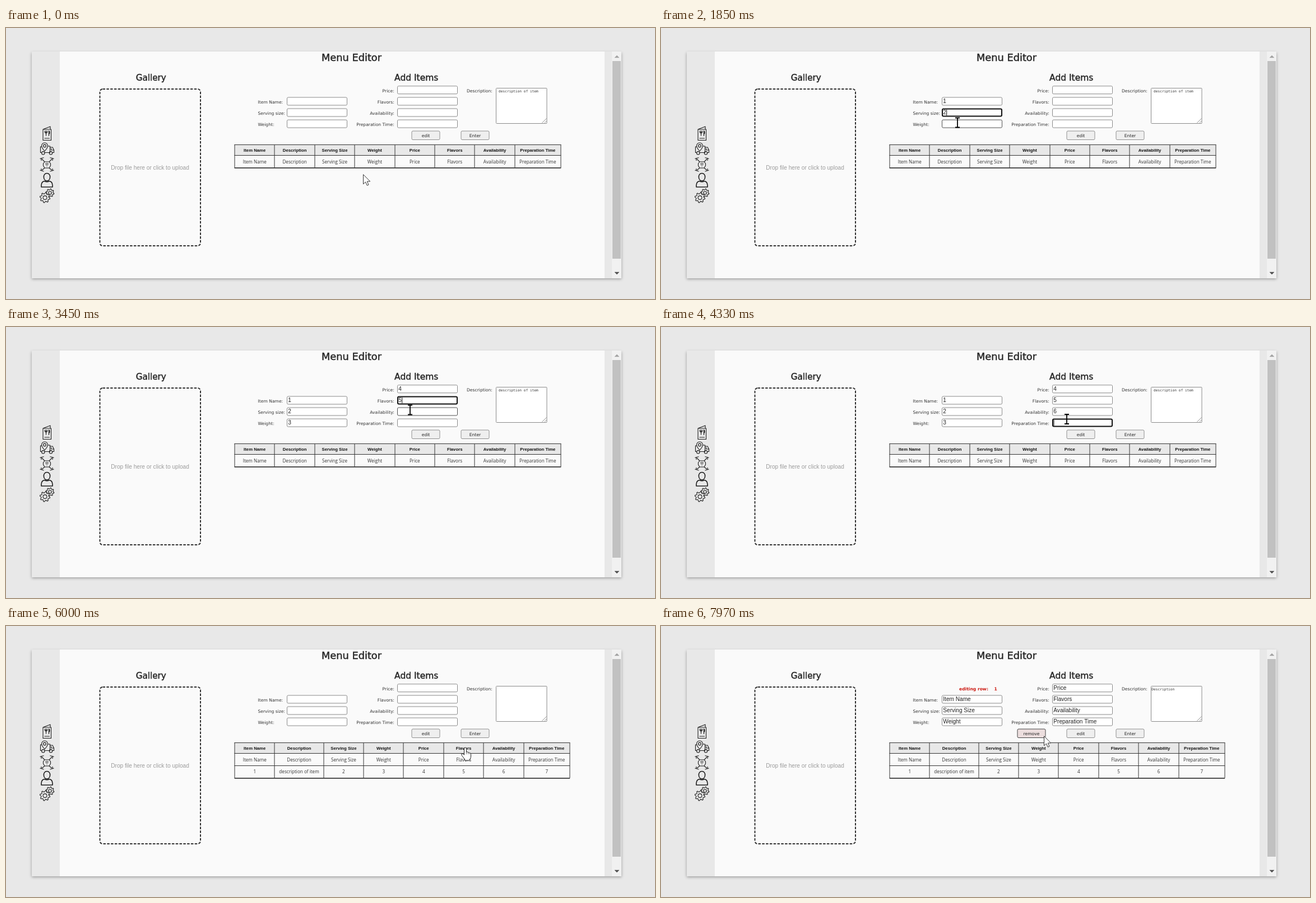
These frames come from a looping animation (1158x484 px, 8 s). An HTML page with a canvas:

```html
<!DOCTYPE html>
<html lang="en">
<head>
<meta charset="utf-8">
<title>Menu Editor</title>
<style>
html, body { margin: 0; width: 100%; height: 100%; overflow: hidden; background: #e8e8e8 }
canvas { display: block }
</style>
</head>
<body>
<canvas id="stage" width="1158" height="484"></canvas>
<script>
const ctx = document.getElementById('stage').getContext('2d');
const SANS = '"DejaVu Sans", Verdana, sans-serif';
const ARIAL = '"Liberation Sans", Arial, sans-serif';
const OPEN = '"Open Sans", sans-serif';
const MONO = '"DejaVu Sans Mono", monospace';
const LOOP = 8000, SUBMIT = 5230, BLUR = 5090, EDIT = 7110;

const columns = ['Item Name', 'Description', 'Serving Size', 'Weight', 'Price', 'Flavors', 'Availability', 'Preparation Time'];
const added = ['1', 'description of item', '2', '3', '4', '5', '6', '7'];

// label, column, left, top, time of focus, time of typing
const fields = [
  ['Item Name:', 0, 501, 123.4, 900, 1220],
  ['Serving size:', 2, 501, 143.5, 1530, 1690],
  ['Weight:', 3, 501, 163.6, 2140, 2215],
  ['Price:', 4, 698, 103.2, 2600, 2750],
  ['Flavors:', 5, 698, 123.4, 3070, 3300],
  ['Availability:', 6, 698, 143.5, 3700, 3860],
  ['Preparation Time:', 7, 698, 163.6, 4330, 4480]
].map(([label, col, x, y, focus, typed]) => ({ label, col, x, y, focus, typed, w: 108, h: 15 }));

// pointer moves: first step, last step, number of steps, destination
const moves = [
  [70, 300, 4, 524, 89], [470, 730, 4, 530, 134], [1220, 1290, 2, 530, 153],
  [1770, 1850, 2, 529, 169], [2290, 2450, 3, 722, 110], [2750, 2820, 2, 722, 133],
  [3140, 3140, 1, 722, 150], [3380, 3450, 2, 721, 148], [3940, 4020, 2, 724, 164.5],
  [4560, 5010, 7, 829, 192], [6000, 6000, 1, 819.5, 217], [6080, 6560, 7, 802, 237.5],
  [7420, 7420, 1, 797, 236.5], [7500, 7970, 7, 683, 196]
];
const clicks = [[820, 990], [1450, 1610], [2060, 2215], [2530, 2680], [2990, 3140],
  [3620, 3780], [4240, 4330], [5090, 5300], [6960, 7190]];

function pointer(t) {
  let x = 637, y = 261;
  for (const [from, to, n, tx, ty] of moves) {
    if (t < from) break;
    const step = n > 1 ? Math.floor((t - from) / (to - from) * (n - 1) + 0.01) + 1 : 1;
    const k = Math.min(1, step / n);
    x += (tx - x) * k;
    y += (ty - y) * k;
  }
  return { x, y };
}

const inside = (p, r) => p.x >= r.x && p.x <= r.x + r.w && p.y >= r.y && p.y <= r.y + r.h;

function rect(x, y, w, h, color) {
  ctx.fillStyle = color;
  ctx.fillRect(x, y, w, h);
}

function box(x, y, w, h, fill, stroke, line = 1, r = 2) {
  ctx.beginPath();
  ctx.roundRect(x + line / 2, y + line / 2, w - line, h - line, r);
  ctx.fillStyle = fill;
  ctx.fill();
  ctx.strokeStyle = stroke;
  ctx.lineWidth = line;
  ctx.stroke();
}

function text(str, x, y, font, color = '#333', align = 'left') {
  ctx.font = font;
  ctx.fillStyle = color;
  ctx.textAlign = align;
  ctx.fillText(str, x, y);
}

function heading(str, x, y, size) {
  text(str, x, y, `${size}px ${SANS}`, '#262626', 'center');
  ctx.strokeStyle = '#262626';
  ctx.lineWidth = 0.45;
  ctx.strokeText(str, x, y);
}

function draw(d, line = 1, fill, x = 0, y = 0, color = '#1c1c1c') {
  ctx.save();
  ctx.translate(x, y);
  const path = new Path2D(d);
  if (fill) {
    ctx.fillStyle = fill;
    ctx.fill(path);
  }
  ctx.strokeStyle = color;
  ctx.lineWidth = line;
  ctx.lineJoin = 'round';
  ctx.stroke(path);
  ctx.restore();
}

const ring = (x, y, r) => `M${x + r} ${y}a${r} ${r} 0 1 0 ${-2 * r} 0a${r} ${r} 0 1 0 ${2 * r} 0z`;

function gear(x, y, r, hole) {
  let d = '';
  for (let i = 0; i < 32; i++) {
    const a = (i + 0.5) * Math.PI / 16, q = i % 4 < 2 ? r : r * 0.76;
    d += `${i ? 'L' : 'M'}${x + q * Math.cos(a)} ${y + q * Math.sin(a)}`;
  }
  draw(d + 'Z' + ring(x, y, hole), 1.1, '#e8e8e8');
}

function icons() {
  // menu
  draw('M66 181H80.5V200.5H66ZM66 181L79 176V181', 1.1);
  draw('M69.5 183.5v3q2 2 4 0v-3M71.5 183.5v9M76.5 193v-9.5q2 2 1 5.5h-1M68.5 197h9.5', 1.2);
  // truck
  draw('M64 212H61.5V222.5H63.5M74 211H78.5V222.5H69M78.5 213H83L85.5 218V222.5H83M78.5 222.5H77M80.5 214.5v3.5h4.5', 1.1);
  draw('M69 220C66 216 63.5 214 63.5 210.5a5.5 5.5 0 0 1 11 0C74.5 214 72 216 69 220Z' + ring(69, 210.5, 2.4), 1.1);
  draw(ring(66.3, 223.3, 2.7) + ring(80, 223.3, 2.7), 1.1);
  // drone
  draw('M69 239h8l2.5 3v4l-2.5 4h-8l-2.5-4v-4zM69 239L64 234M77 239L82 234M69 250L64 254M77 250L82 254', 1.1);
  draw('M60.5 233.5l7-2M78.5 231.5l7 2M60.5 254l7 2M78.5 256l7-2M63 232v5M83 232v5M63 251v4M83 251v4', 1.1);
  draw('M70 243q3-2.5 6 0M71.3 245q1.7-1.3 3.4 0M73 247v.8', 1);
  // user
  draw('M73 259.5c8 0 7 13.5 0 13.5s-8-13.5 0-13.5zM63 284V281c0-5 3-7.5 6-7.5q4 2.5 8 0c3 0 6 2.5 6 7.5v3z', 1.6);
  // settings
  gear(78.5, 294.5, 7.3, 2.7);
  gear(69.5, 303, 9, 3.4);
}

function frame() {
  rect(0, 0, 1158, 484, '#e8e8e8');
  ctx.save();
  ctx.shadowColor = 'rgba(0,0,0,.35)';
  ctx.shadowBlur = 5;
  ctx.shadowOffsetY = 1.5;
  rect(46, 42, 1052, 405, '#e8e8e8');
  ctx.restore();
  rect(96, 42, 972, 405, '#fafafa');
  rect(1081, 42, 17, 405, '#f1f1f1');
  rect(1082, 59, 15, 353, '#c1c1c1');
  draw('M1086 53L1090 49L1094 53Z', 0.5, '#a3a3a3', 0, 0, '#a3a3a3');
  draw('M1086 436L1090 440L1094 436Z', 0.5, '#505050', 0, 0, '#505050');
  icons();

  heading('Menu Editor', 616.5, 59, 17.8);
  heading('Gallery', 258.7, 94.3, 15.2);
  heading('Add Items', 732.2, 94.3, 15.5);

  ctx.setLineDash([4.5, 2.3]);
  box(166.5, 108, 181.5, 282, '#fafafa', '#333', 2, 5);
  ctx.setLineDash([]);
  text('Drop file here or click to upload', 257, 252.7, `10.15px ${ARIAL}`, '#9c9c9c', 'center');
}

function form(t, p) {
  const label = `7.6px ${SANS}`;
  const focused = t < BLUR ? fields.filter(f => t >= f.focus).pop() : null;
  for (const f of fields) {
    const left = f.x < 600, active = f === focused;
    text(f.label, left ? 449.5 : 692.7, f.y + 11.4, label, '#333', left ? 'left' : 'right');
    box(f.x, f.y, f.w, f.h, '#fff', active ? '#101010' : inside(p, f) ? '#4f4f4f' : '#8a8a8a', active ? 2 : 1);
    const value = t >= EDIT ? columns[f.col] : t >= f.typed && t < SUBMIT ? added[f.col] : '';
    text(value, f.x + 2.3, f.y + 10.6, `10.1px ${ARIAL}`, '#222');
    if (active) rect(f.x + 2.6 + ctx.measureText(value).width, f.y + 2.3, 1, 10.5, '#111');
  }

  text('Description:', 822, 114.6, label);
  box(874, 107, 91.5, 64, '#fff', '#8a8a8a', 1, 1);
  draw('M956.5 169.5l8-8M961 169.5l3.5-3.5', 0.8, null, 0, 0, '#777');
  if (t < SUBMIT) text(added[1], 879, 114.6, `6.2px ${MONO}`);
  if (t >= EDIT) {
    text(columns[1], 875.3, 114.6, `6.2px ${MONO}`);
    text('editing row:', 532, 114.6, `bold 7.6px ${SANS}`, '#cc1a12');
    text('1', 594.5, 114.6, `bold 7.6px ${SANS}`, '#cc1a12');
  }

  const buttons = [['edit', 723.5, '#e5e5e5'], ['Enter', 811.5, '#e5e5e5']];
  if (t >= EDIT) buttons.push(['remove', 635.5, '#ecdede']);
  for (const [name, x, tint] of buttons) {
    const over = inside(p, { x, y: 183.5, w: 51, h: 16.5 });
    box(x, 183.5, 51, 16.5, over ? tint : '#efefef', over ? '#444' : '#8f8f8f');
    text(name, x + 25.5, 194.6, label, '#222', 'center');
  }
}

// returns true when the pointer is on the table
function table(t, p) {
  const grown = t >= SUBMIT;
  const widths = [71.4, grown ? 87.3 : 71.4, 71.4, 71.4, 71.4, 71.4, 71.4, 82];
  const total = widths.reduce((a, b) => a + b);
  const tops = grown ? [208, 227.5, 249.5, 271] : [208, 227.5, 249.5];
  const bottom = tops[tops.length - 1];
  const lines = [columns, columns, added];
  for (let r = 0; r < tops.length - 1; r++) {
    const row = { x: 408, y: tops[r], w: total, h: tops[r + 1] - tops[r] };
    rect(row.x, row.y, row.w, row.h, !r ? '#e8e8e8' : inside(p, row) ? '#cccccc' : '#fafafa');
    let x = 408;
    widths.forEach((w, i) => {
      text(lines[r][i], x + w / 2, [221, 241.6, 263.2][r], r ? `8.15px ${OPEN}` : `bold 7.75px ${ARIAL}`, r ? '#333' : '#111', 'center');
      x += w;
    });
  }
  for (const y of tops) rect(407.5, Math.floor(y), total + 1, y === bottom ? 1.7 : 1, '#333');
  let x = 408;
  for (const w of [0, ...widths]) rect(Math.round(x += w) - 0.5, 208, 1, bottom - 208, '#333');
  return inside(p, { x: 408, y: 208, w: total, h: bottom - 208 });
}

function cursor(t, p, onTable) {
  if (clicks.some(([a, b]) => t >= a && t < b)) {
    ctx.beginPath();
    ctx.arc(p.x, p.y, 11.5, 0, 7);
    ctx.fillStyle = 'rgba(255,240,20,.75)';
    ctx.fill();
  }
  if (fields.some(f => inside(p, f))) {
    draw('M-4-8.5H4M-4 8.5H4M0-8.5V8.5', 1.8, null, p.x, p.y, '#000');
  } else if (onTable) {
    draw('M-2 1.5q2-3 4 0V8q2.5-1 3 1q2.300-.8 2.700.8q2-.3 2.300 1.700V16q0 3-2 5v2H-1v-2L-6 14.500q-2-3 0-3.700q1.500-.3 4 2.400Z', 1, '#fff', p.x, p.y, '#222');
    draw('M2 8v4M5 9v3M7.700 9.800v2.500', 0.8, null, p.x, p.y, '#555');
  } else {
    draw('M0 0V17L4 13.300L6.800 19.500L9.500 18.300L6.800 12.300H12.200Z', 1, '#fff', p.x + 0.5, p.y + 0.7, '#333');
  }
}

function render(now) {
  const t = now % LOOP, p = pointer(t);
  frame();
  form(t, p);
  cursor(t, p, table(t, p));
}

let start;
function tick(now) {
  start ??= now;
  render(now - start);
  requestAnimationFrame(tick);
}
requestAnimationFrame(tick);
</script>
</body>
</html>
```
